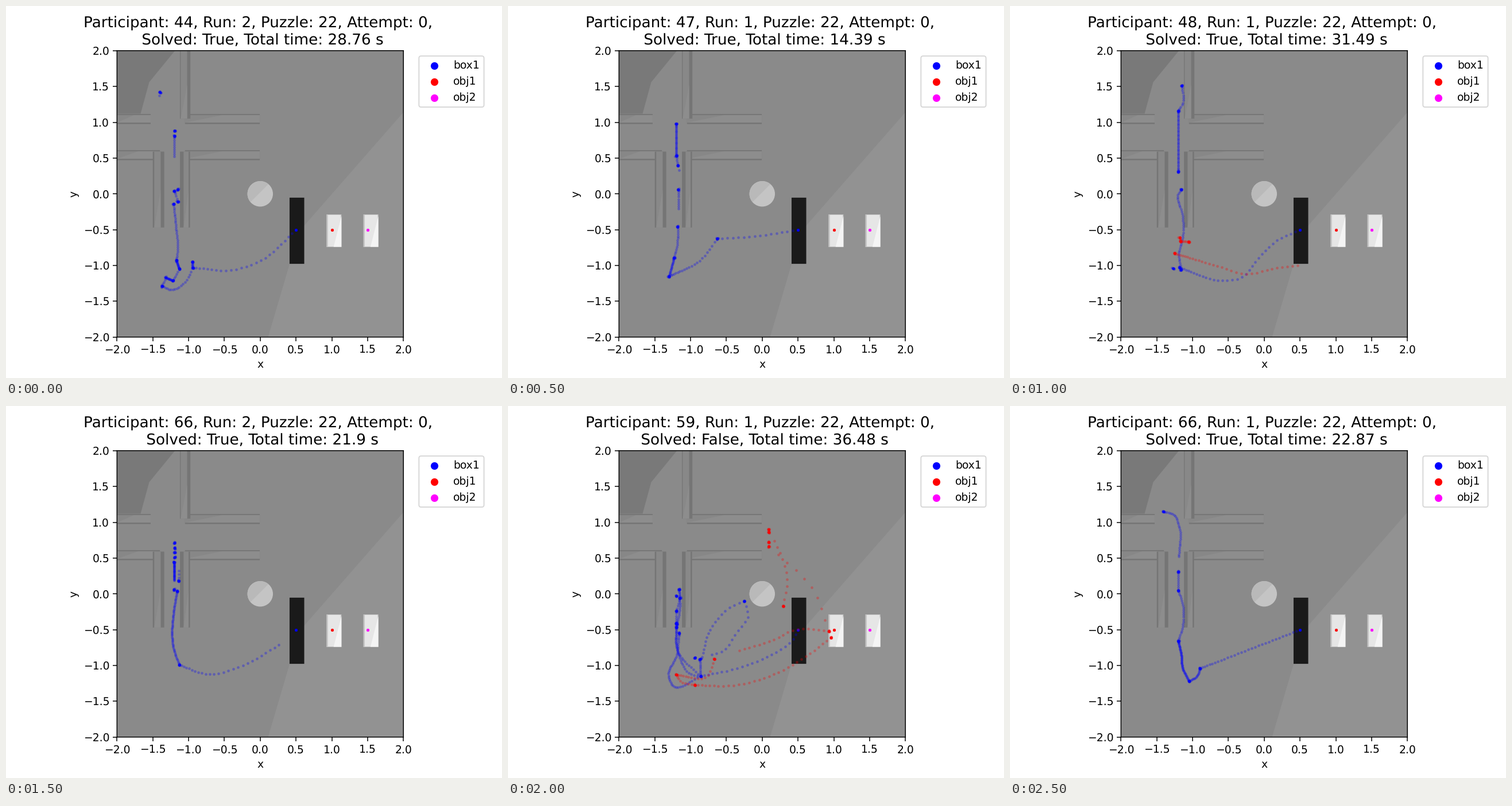
A matplotlib script for the animation above (3000 ms loop, 864 px wide and 648 px high).

```python
import numpy as np
import matplotlib.pyplot as plt
from matplotlib.animation import FuncAnimation
from matplotlib.patches import Circle, Polygon

W, H, DPI = 864, 648, 135
COLORS = {"box1": "blue", "obj1": "red", "obj2": "magenta"}
STARTS = {"box1": (0.5, -0.5), "obj1": (1.0, -0.5), "obj2": (1.5, -0.5)}

plt.rcParams.update({"font.family": "DejaVu Sans", "text.hinting": "no_hinting",
                     "path.snap": False})
fig, ax = plt.subplots(figsize=(W / DPI, H / DPI), dpi=DPI)
rng = np.random.default_rng(4)


def smooth(p):
    """Fine Hermite curve through the points p."""
    h = np.hypot(*np.diff(p, axis=0).T)
    slope = np.gradient(p, np.r_[0, np.cumsum(h)], axis=0)
    t = np.linspace(0, 1, 40)[:, None]
    return np.vstack([
        (2 * t**3 - 3 * t**2 + 1) * p[i] + (3 * t**2 - 2 * t**3) * p[i + 1]
        + d * ((t**3 - 2 * t**2 + t) * slope[i] + (t**3 - t**2) * slope[i + 1])
        for i, d in enumerate(h)])


def sample(p, slow):
    """Dots at equal time steps: quick on the open floor, slow in the corridor."""
    q = smooth(p)
    step = np.interp(q[1:, 0], [-1.25, -0.5], [0.025, 0.07]) / slow
    time = np.r_[0, np.cumsum(np.hypot(*np.diff(q, axis=0).T) / step)]
    at = np.linspace(0, time[-1], max(2, round(time[-1])))
    return np.c_[np.interp(at, time, q[:, 0]), np.interp(at, time, q[:, 1])]


class Track:
    """Positions of one object; it rests where each move ends."""

    def __init__(self, who):
        self.who, self.dots = who, []
        self.rest(*STARTS[who], spread=0)

    def jump(self, x, y):
        self.pos = (x, y)
        return self

    def rest(self, x, y, hold=10, spread=0.006):
        self.dots.append(rng.normal((x, y), spread, (hold, 2)))
        return self.jump(x, y)

    def go(self, *xy, slow=1, hold=10):
        p = np.reshape((*self.pos, *xy), (-1, 2))
        self.dots.append(sample(p, slow))
        return self.rest(*p[-1], hold=hold)

    def draw(self):
        x, y = np.vstack(self.dots).T
        return ax.scatter(x, y, s=3, c=COLORS[self.who], alpha=0.2, zorder=2)


def shape(color, *xy):
    ax.add_patch(Polygon(np.reshape(xy, (-1, 2)), fc=color, lw=0))


def rect(color, x0, y0, x1, y1):
    shape(color, x0, y0, x1, y0, x1, y1, x0, y1)


def wall(x0, y0, x1, y1, lo, hi):
    """Wall with shaded long sides, lo wide at left or bottom, hi at right or top."""
    rect("#757575", x0, y0, x1, y1)
    if x1 - x0 > y1 - y0:
        y0, y1 = y0 + lo, y1 - hi
        rect("#878787", x0, y0, x1, y1)
        mid = (x0 + x1) / 2
        shape("#8d8d8d", x0, y0, mid, y1, x1, y1, x1, y0)
    else:
        x0, x1 = x0 + lo, x1 - hi
        rect("#888888", x0, y0, x1, y1)
        shape("#8d8d8d", x0, y0, x1, (y0 + y1) / 2, x1, y0)


def scene():
    rect("#8a8a8a", -2, -2, 2, 2)
    shape("#929292", 2, 1.14, 0.6, -0.46, 0.41, -0.98, 0.11, -2, 2, -2)
    shape("#797979", -2, 2, -1.19, 2, -1.55, 1.56, -1.67, 1.12, -2, 1.12)
    for y, end in ((0.975, -1.53), (0.47, -1.4)):
        wall(-2, y, end, y + 0.14, 0.02, 0.015)
        wall(-1.05, y, -0.006, y + 0.14, 0.02, 0.015)
    wall(-1.12, 1.05, -0.975, 2, 0.01, 0.045)
    wall(-1.12, -0.47, -0.98, 0.59, 0.05, 0.02)
    wall(-1.5, -0.47, -1.34, 0.59, 0.02, 0.05)

    ax.add_patch(Circle((0, 0), 0.178, fc="#c4c4c4", lw=0))
    arc = np.radians(np.linspace(50, 220, 40))
    shape("#b9b9b9", *(0.178 * np.c_[np.cos(arc), np.sin(arc)]).ravel())
    rect("#1a1a1a", 0.41, -0.977, 0.615, -0.053)
    for x in (0.925, 1.44):
        rect("#c4c4c4", x, -0.743, x + 0.21, -0.287)
        rect("#e6e6e6", x + 0.02, -0.735, x + 0.2, -0.295)
        shape("#f4f4f4", x + 0.21, -0.74, x + 0.1, -0.74, x + 0.21, -0.31)


def run_a():
    box = Track("box1")
    box.go(0.01, -0.93, -0.37, -1.06, -0.94, -1.03).go(-0.945, -0.95, slow=3)
    box.go(-0.96, -1.06, -1.09, -1.27, -1.23, -1.34, -1.37, -1.29)
    box.go(-1.32, -1.17, hold=4).go(-1.22, -1.21, slow=4).go(-1.13, -1.05)
    box.go(-1.17, -0.93, slow=4).go(-1.15, -0.72, -1.17, -0.52, -1.21, -0.14)
    box.go(-1.15, -0.11).go(-1.2, 0.04).go(-1.15, 0.06)
    box.jump(-1.2, 0.52).go(-1.2, 0.81).rest(-1.2, 0.88)
    box.jump(-1.41, 1.37).go(-1.4, 1.42)
    return [box]


def run_b():
    box = Track("box1")
    box.go(-0.1, -0.59, -0.63, -0.625).go(-0.87, -0.93, -1.3, -1.15)
    box.go(-1.23, -0.89, slow=2).go(-1.19, -0.74, -1.18, -0.46)
    box.jump(-1.17, -0.21).go(-1.17, 0.06)
    box.jump(-1.16, 0.33).go(-1.18, 0.4).go(-1.2, 0.53).go(-1.2, 0.98, slow=2)
    return [box]


def run_c():
    box, obj = Track("box1"), Track("obj1")
    box.go(0.15, -0.67, -0.1, -0.92, -0.32, -1.17, -0.6, -1.21, -1.18, -1.03)
    box.rest(-1.27, -1.04).rest(-1.16, -1.06)
    box.go(-1.19, -0.82, -1.14, -0.62, -1.14, -0.3, -1.2, 0, -1.16, 0.06)
    box.rest(-1.2, 0.31).go(-1.2, 0.78, -1.2, 1.16, slow=1.5)
    box.go(-1.14, 1.26, -1.15, 1.51)
    obj.jump(0.47, -1).go(0.15, -1.04, -0.26, -1.12, -0.65, -1.01, -1.25, -0.83)
    obj.rest(-1.18, -0.61).rest(-1.17, -0.66).go(-1.05, -0.67, slow=2)
    return [box, obj]


def run_d():
    box = Track("box1")
    box.jump(0.26, -0.71).go(-0.18, -0.97, -0.74, -1.12, -1.13, -0.99)
    box.go(-1.21, -0.76, -1.21, -0.26, -1.16, 0.04, slow=1.5).go(-1.2, 0.06)
    box.jump(-1.14, 0.32).go(-1.14, 0.18)
    box.jump(-1.2, 0.19).go(-1.2, 0.44, slow=4)
    for y in np.arange(0.51, 0.75, 0.067):
        box.rest(-1.195, y)
    return [box]


def run_e():
    box, obj = Track("box1"), Track("obj1")
    box.go(0.41, -0.66, 0.25, -0.78, -0.25, -1.01, -0.86, -1.15)
    box.go(-0.87, -0.91, slow=2).go(-0.94, -0.89)
    box.jump(-0.86, -1.15).go(-1.24, -1.29, -1.31, -1.13, -1.2, -0.87, -1.16, -0.55)
    for lag in (0, 0.05):
        box.jump(-0.86, -1.15).go(lag - 1, lag - 1.12, -1.18, -0.8, -1.2, lag - 0.46)
    box.go(-1.2, -0.24).go(-1.15, -0.06).go(-1.16, 0.06).go(-1.15, -0.2, -1.19, -0.42)
    box.rest(-1.2, -0.03)
    box.jump(-0.84, -0.88).go(-0.74, -0.53, -0.48, -0.21, -0.25, -0.1)
    box.go(-0.2, -0.31, -0.36, -0.54, -0.55, -0.8, -0.7, -0.85, hold=0)
    obj.go(0.96, -0.61).go(0.54, -0.92, 0.02, -1.18, -0.42, -1.28, -0.94, -1.27)
    obj.go(-1.14, -1.22, -1.2, -1.13).go(-0.77, -1.15, -0.67, -0.91)
    obj.jump(-0.32, -0.79).go(0.14, -0.65, 0.46, -0.5, 0.93, -0.52)
    obj.go(0.71, 0.06, 0.23, 0.55, slow=0.5, hold=0)
    obj.jump(0.17, 0.74).go(0.3, 0.43, 0.35, 0.18, 0.29, -0.17, slow=0.8)
    for y in (0.66, 0.72, 0.86, 0.9):
        obj.rest(0.09, y)
    return [box, obj]


def run_f():
    box = Track("box1")
    box.go(-0.07, -0.72, -0.9, -1.04, slow=1.4).go(-0.93, -1.14, -1.05, -1.22, slow=3)
    box.go(-1.14, -1.03, -1.16, -0.84, -1.2, -0.66, slow=3)
    box.go(-1.14, -0.45, -1.14, -0.14, -1.2, 0.05)
    box.jump(-1.2, 0.09).go(-1.2, 0.31)
    box.jump(-1.19, 0.52).go(-1.19, 0.95, -1.26, 1.1, -1.41, 1.15)
    return [box]


RUNS = [
    (run_a, 44, 2, True, 28.76), (run_b, 47, 1, True, 14.39),
    (run_c, 48, 1, True, 31.49), (run_d, 66, 2, True, 21.9),
    (run_e, 59, 1, False, 36.48), (run_f, 66, 1, True, 22.87),
]

grid = np.arange(-2, 2.1, 0.5)
ax.set(xlim=(-2, 2), ylim=(-2, 2), aspect="equal", xlabel="x", ylabel="y",
       xticks=grid, yticks=grid)
scene()
for who, color in COLORS.items():
    ax.scatter([], [], s=36, c=color, label=who)
ax.legend(loc="upper right", bbox_to_anchor=(1.3, 1))
title = ax.set_title("", fontsize=14)

layers = []
for build, *_ in RUNS:
    tracks = {t.who: t for t in build()}
    layers.append([(tracks.get(who) or Track(who)).draw() for who in COLORS])


def update(i):
    for k, layer in enumerate(layers):
        for dots in layer:
            dots.set_visible(k == i)
    _, person, run, solved, seconds = RUNS[i]
    title.set_text(f"Participant: {person}, Run: {run}, Puzzle: 22, Attempt: 0, \n"
                   f" Solved: {solved}, Total time: {seconds} s")
    return [title]


anim = FuncAnimation(fig, update, frames=len(RUNS), interval=500,
                     repeat=True, repeat_delay=0)
plt.show()
```
